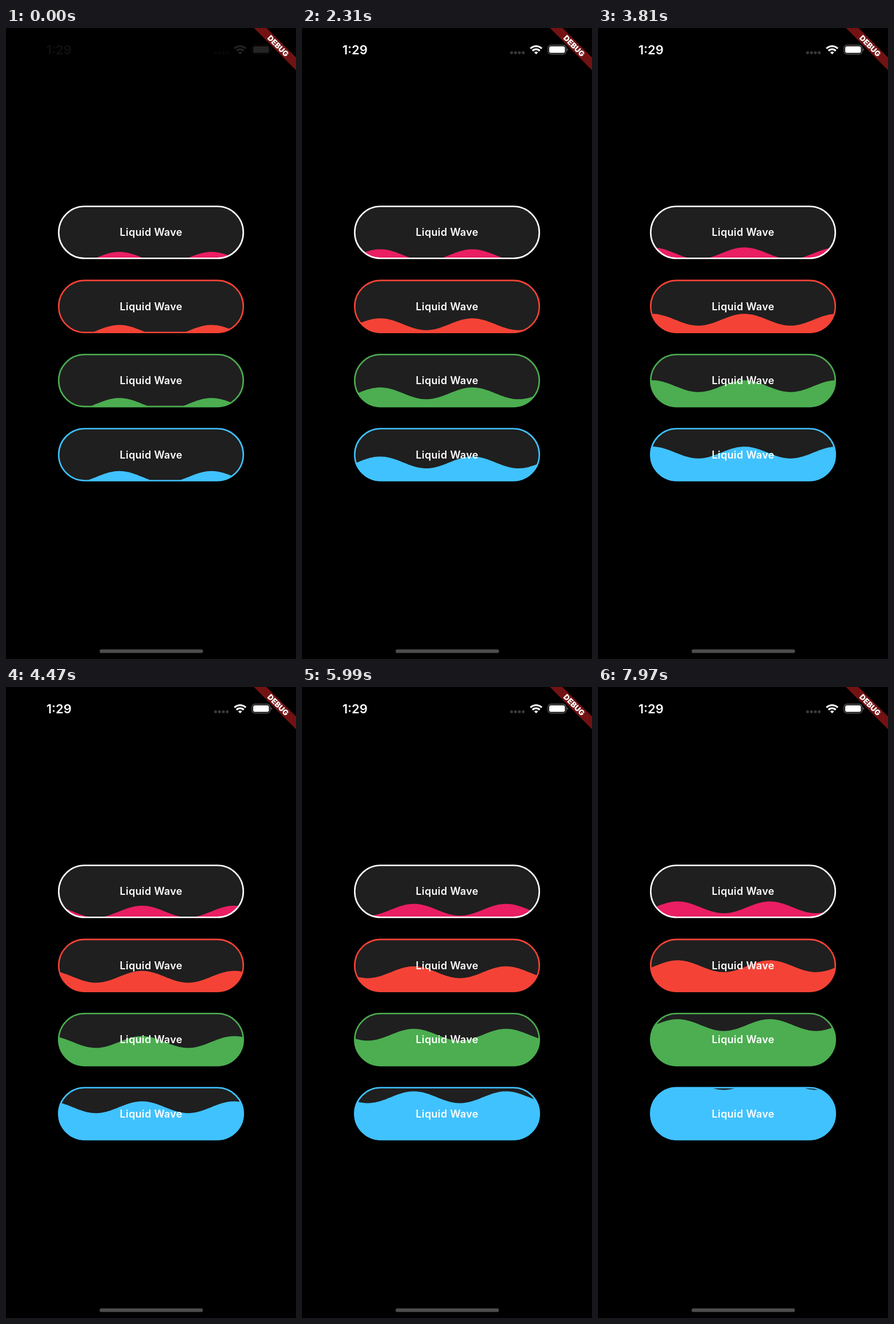
Write an HTML page that moves like this. It is 508 px wide and 1102 px high and loops after 8 s.

```html
<!DOCTYPE html>
<html lang="en">
<head>
<meta charset="utf-8">
<title>Liquid Wave buttons</title>
<style>
  html, body { margin: 0; width: 100%; height: 100%; overflow: hidden; background: #000; }
  svg { display: block; width: 508px; height: 1102px; }
  text { font-family: Inter, Roboto, sans-serif; fill: #fff; text-anchor: middle; }
  .label { font-size: 18px; font-weight: 600; letter-spacing: .35px; }
  .clock { font-size: 22px; font-weight: 600; }
  .debug { font-size: 13.3px; font-weight: 900; }
</style>
</head>
<body>
<svg viewBox="0 0 508 1102">
  <rect width="508" height="1102" fill="#000"/>
  <text id="clock" class="clock" x="92.7" y="45.8">1:29</text>
  <g id="icons">
    <g fill="#3a3a3a">
      <rect x="364.6" y="40.8" width="5" height="5" rx="2"/>
      <rect x="371.4" y="40.8" width="5" height="5" rx="2"/>
      <rect x="378.2" y="40.8" width="5" height="5" rx="2"/>
      <rect x="385" y="40.8" width="5" height="5" rx="2"/>
    </g>
    <g fill="none" stroke="#fff" stroke-width="3.1">
      <path d="M400.2 35.9a14 14 0 0 1 19.8 0"/>
      <path d="M403.8 39.8a8.8 8.8 0 0 1 12.6 0"/>
    </g>
    <path d="M406.7 42.6a4.8 4.8 0 0 1 6.8 0l-3.4 3.5z" fill="#fff"/>
    <rect x="431" y="30" width="31.6" height="15.6" rx="5" fill="none" stroke="#606060" stroke-width="1.3"/>
    <rect x="433" y="32" width="27.6" height="11.6" rx="3.4" fill="#fff"/>
    <path d="M464.2 35.2q1.8 .9 1.8 2.6t-1.8 2.6z" fill="#606060"/>
  </g>
  <g id="buttons"></g>
  <g transform="translate(508 0) rotate(45)">
    <rect x="-60" y="36.5" width="120" height="15.6" fill="#731212"/>
    <text class="debug" x="0" y="49.1">DEBUG</text>
  </g>
  <rect x="164" y="1085.3" width="181" height="6.3" rx="3.15" fill="#4d4d4d"/>
</svg>
<script>
const LOOP = 8000;
const LEFT = 92.3, WIDTH = 323.4, HEIGHT = 90.8;
const WAVE = 161.5, AMP = 10.3, CREST_X = 198.5;
// leftward drift of the waves: [ms, px]
const DRIFT = [[0, 0], [1200, 31], [2310, 61.5], [3810, 103.5], [5060, 138], [6840, 188], [8000, 221.3]];
const STYLES = [
  { border: '#fff', fill: '#e91e63' },
  { border: '#f44336', fill: '#f44336' },
  { border: '#4cae50', fill: '#4cae50' },
  { border: '#40c2ff', fill: '#40c2ff' }
];
const byId = id => document.getElementById(id);

byId('buttons').innerHTML = STYLES.map(({ border, fill }, i) => {
  const mid = 356.9 + 129.4 * i;
  const pill = `x="${LEFT}" y="${mid - HEIGHT / 2}" width="${WIDTH}" height="${HEIGHT}" rx="${HEIGHT / 2}"`;
  return `<clipPath id="pill${i}"><rect ${pill}/></clipPath>
    <rect ${pill} fill="#1f1f1f"/>
    <path id="wave${i}" fill="${fill}" clip-path="url(#pill${i})"/>
    <rect ${pill} fill="none" stroke="${border}" stroke-width="2.6"/>
    <text class="label" x="254.2" y="${mid + 6.5}">Liquid Wave</text>`;
}).join('');

const waves = STYLES.map((_, i) => byId('wave' + i));

function driftAt(t) {
  const k = DRIFT.findIndex(p => p[0] > t);
  const [t0, d0] = DRIFT[k - 1], [t1, d1] = DRIFT[k];
  return d0 + (d1 - d0) * (t - t0) / (t1 - t0);
}

function wavePath(i, drift) {
  const rise = (16.5 + 24.8 * i) / 220.5;
  const level = 391 + 127.6 * i + AMP - rise * drift;
  const bottom = 410 + 129.4 * i;
  let d = `M88 ${bottom}`;
  for (let x = 88; x <= 420; x += 2) {
    const y = level - AMP * Math.cos((x - CREST_X + drift) * 2 * Math.PI / WAVE);
    d += `L${x} ${y.toFixed(2)}`;
  }
  return d + `V${bottom}Z`;
}

function draw(t) {
  const drift = driftAt(t);
  waves.forEach((wave, i) => wave.setAttribute('d', wavePath(i, drift)));
  const fade = Math.min(1, t / 350);
  byId('clock').setAttribute('opacity', 0.06 + 0.94 * fade);
  byId('icons').setAttribute('opacity', 0.14 + 0.86 * fade);
}

const start = performance.now();
function tick() {
  draw((performance.now() - start) % LOOP);
  requestAnimationFrame(tick);
}
draw(0);
requestAnimationFrame(tick);
</script>
</body>
</html>
```
